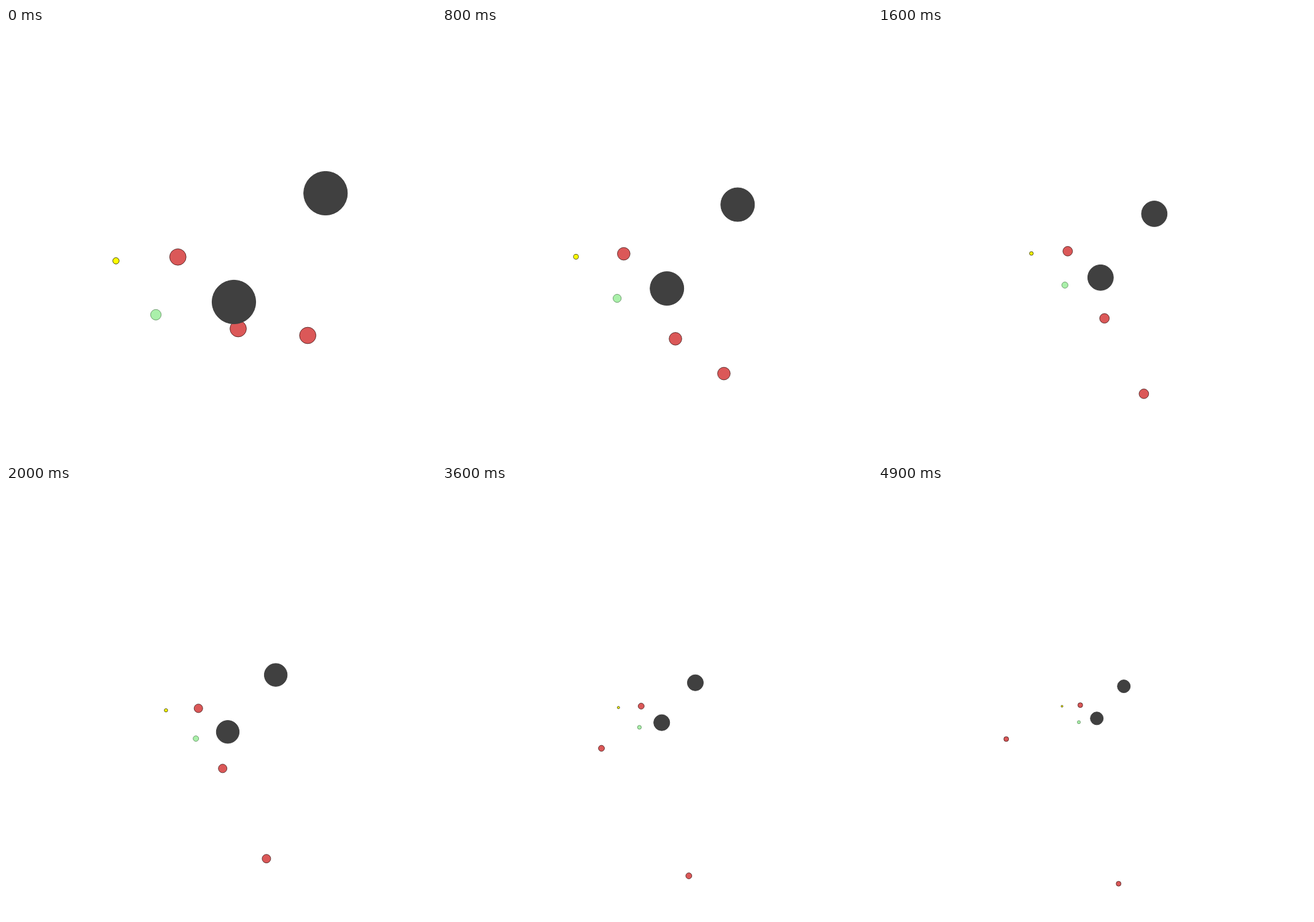
These frames come from a looping animation (700x700 px, 5000 ms). An HTML page with a canvas:

```html
<!DOCTYPE html>
<html>
<head>
<meta charset="utf-8">
<style>
html, body { margin: 0; height: 100%; overflow: hidden; background: #fff; }
canvas { display: block; }
</style>
</head>
<body>
<canvas id="stage" width="700" height="700"></canvas>
<script>
const ctx = document.getElementById('stage').getContext('2d');
const LOOP = 5000, STEP = 100, HALF = 350, TOP_SPEED = 17.87;

const RED = ['#db5858', 'rgba(40,10,10,0.7)'];
const GREEN = ['#aaf0aa', 'rgba(60,110,60,0.65)'];
const YELLOW = ['#ffff00', 'rgba(40,40,0,0.8)'];
const DARK = ['#404040', '#404040'];

// Distance covered after n steps, speeding up evenly to top speed over `ramp` steps
function accelerate(n, ramp) {
  if (n <= 0) return 0;
  return n < ramp ? TOP_SPEED * n * n / (2 * ramp) : TOP_SPEED * (n - ramp / 2);
}

function draw(n) {
  const fallY = 150.5 + accelerate(n, 2);
  const drag = Math.pow(0.76, n);
  const runX = 40.3 - 12.3 * drag - accelerate(n - 12.2, 15.5);
  const runY = 210 - 70.5 * drag;
  const rest = Math.max(0, 1 - n / 15);
  const greenX = -78 - 28 * rest * rest;

  // The view zooms out as the falling ball gets farther away
  const zoom = 1 / (1 + Math.max(0, fallY - 171.8) / HALF);

  function ball(x, y, r, [fill, line]) {
    ctx.beginPath();
    ctx.arc(HALF + x * zoom, HALF + y * zoom, r * zoom, 0, 2 * Math.PI);
    ctx.fillStyle = fill;
    ctx.fill();
    ctx.strokeStyle = line;
    ctx.stroke();
  }

  ctx.fillStyle = '#fff';
  ctx.fillRect(0, 0, 700, 700);
  ctx.lineWidth = 1;
  ball(-171, 29, 5.2, YELLOW);
  ball(greenX, 116.8, 8.6, GREEN);
  ball(-70.2, 22.8, 13.4, RED);
  ball(runX, runY, 13.4, RED);
  ball(141.2, fallY, 13.4, RED);
  ball(170.2, -81, 35.6, DARK);
  ball(21, 96, 35.6, DARK);
}

const start = performance.now();
function frame() {
  const t = (performance.now() - start) % LOOP;
  draw(Math.floor(t / STEP));
  requestAnimationFrame(frame);
}
frame();
</script>
</body>
</html>
```
